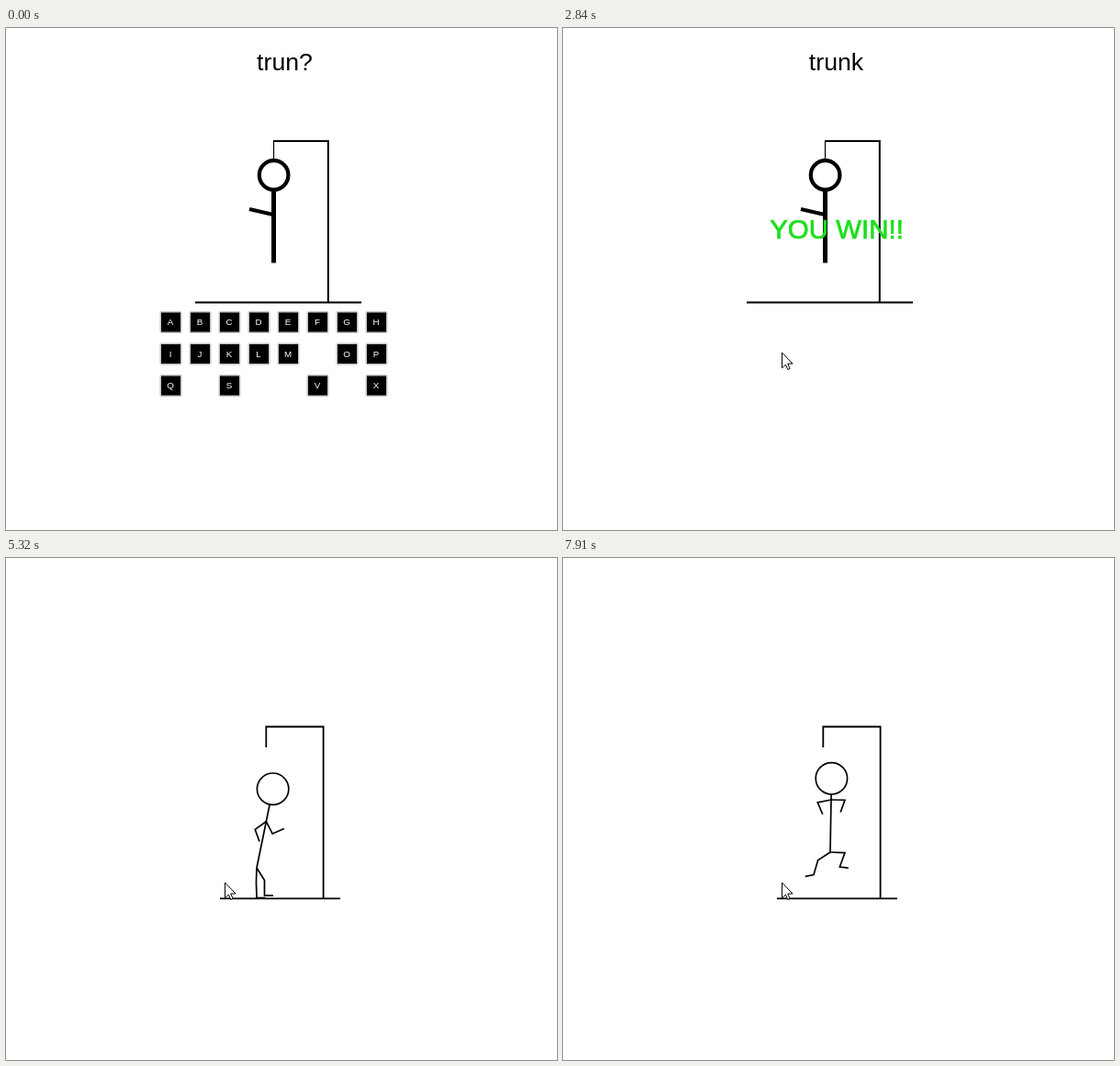
Animation, 600 px wide and 546 px high, one loop 8 s. Source, as an HTML page with a canvas:

```html
<!DOCTYPE html>
<html lang="en">
<head>
<meta charset="utf-8">
<title>Hangman</title>
<style>
  html, body { margin: 0; width: 100%; height: 100%; overflow: hidden; background: #fff; }
  canvas { display: block; }
</style>
</head>
<body>
<canvas id="stage" width="600" height="546"></canvas>
<script>
const ctx = document.getElementById('stage').getContext('2d');
const LOOP = 8000, SCROLL = 500, SOLVED = 1720, CHEER = 1870, DANCE = 3900;
const HOP = 630, SWAY = 2 * HOP, LEAP_AT = 7910, LEFT_AT = 7100;
const FONT = '"Liberation Sans", Arial, sans-serif';
const HEAD = 17.2, ARM = [15, 14], LEG = [16, 16.5, 9.5];

// torso: length, shoulder height, tilt. Limbs: direction of each bone in degrees, 90 is down.
const STAND = { hip: [283.5, 337], torso: [78, 52, 0],
  armL: [188, -56], armR: [-26, -114], legL: [110, 88, 180], legR: [67, 106, 0] };
const LEAN = { hip: [273, 337], torso: [70.4, 51.5, 11.6],
  armL: [144, 70], armR: [63, -24], legL: [92, 88, 360], legR: [58, 90, 0] };
const CROUCH = { hip: [251.5, 337.5], torso: [61.5, 57, 1.4],
  armL: [130, 24], armR: [-7, 104], legL: [132, 60, 152], legR: [0, 112, 6] };
const LEAP = { hip: [291, 320], torso: [63, 57, 1],
  armL: [169, 67], armR: [1, 110], legL: [147, 106, 169], legR: [2, 110, 6] };

const mix = (a, b, k) => a + (b - a) * k;
const ramp = (t, from, to) => Math.min(1, Math.max(0, (t - from) / (to - from)));
const smooth = k => k * k * (3 - 2 * k);
const wave = (t, peak, period) => Math.cos(2 * Math.PI * (t - peak) / period);

function blend(a, b, k) {
  const pose = {};
  for (const part in a) pose[part] = a[part].map((v, i) => mix(v, b[part][i], k));
  return pose;
}

function move([x, y], length, degrees) {
  const angle = degrees * Math.PI / 180;
  return [x + length * Math.cos(angle), y + length * Math.sin(angle)];
}

function line(points, width) {
  ctx.lineWidth = width;
  ctx.beginPath();
  points.forEach(p => ctx.lineTo(...p));
  ctx.stroke();
}

function ring([x, y], r, width) {
  ctx.lineWidth = width;
  ctx.beginPath();
  ctx.arc(x, y, r, 0, 2 * Math.PI);
  ctx.stroke();
}

function text(str, x, y, size, color) {
  ctx.font = `${size}px ${FONT}`;
  ctx.fillStyle = color;
  ctx.fillText(str, x, y);
}

function keyboard() {
  [...'ABCDEFGHIJKLM.OPQ.S..V.X'].forEach((letter, i) => {
    if (letter === '.') return;
    const x = 173.5 + 32 * (i % 8), y = 320 + 34.5 * Math.floor(i / 8);
    ctx.fillStyle = '#c4c4c4';
    ctx.beginPath();
    ctx.roundRect(x - 12, y - 12, 24, 24, 2);
    ctx.fill();
    ctx.fillStyle = '#000';
    ctx.fillRect(x - 10.5, y - 10.5, 21, 21);
    text(letter, x - 0.5, y + 3.3, 9.8, '#fff');
  });
}

function cheer(t) {
  const size = Math.min(207, 66 + 0.0792 * (t - CHEER)) / 4.85;
  const y = 218.3 + 0.358 * size;
  text('YOU WIN!!', 298, y, size, '#1cdf1c');
  ctx.save();
  ctx.strokeStyle = '#1cdf1c';
  ctx.lineWidth = size * 0.025;
  ctx.strokeText('YOU WIN!!', 298, y);
  ctx.restore();
}

function game(t) {
  ctx.save();
  if (t < SCROLL) ctx.translate(6, 0);
  text(t < SOLVED ? 'trun?' : 'trunk', 297.5, 46.3, 26.67, '#000');
  line([[285.5, 143], [285.5, 122]], 1.2);
  line([[285, 123], [344.8, 123], [344.8, 298]], 2);
  line([[200, 298.4], [381, 298.4]], 2);
  ring([285.6, 160], 15.8, 4.2);
  line([[285.5, 177], [285.5, 255.5]], 5);
  line([[259, 197], [285, 203]], 4);
  if (t < SOLVED) keyboard();
  ctx.restore();
  if (t >= CHEER) cheer(t);
}

function poseAt(t) {
  const intro = blend(STAND, LEAN, smooth(ramp(t, 4200, 4930)));
  const dip = Math.sin(Math.PI * ramp(t, DANCE, 4700));
  intro.torso[0] -= 7 * dip;
  intro.torso[2] -= 6 * dip;

  const run = blend(CROUCH, LEAP, Math.max(0, wave(t, LEAP_AT, HOP)));
  run.hip[0] = 275.5 - 25 * wave(t, LEFT_AT, SWAY);
  return blend(intro, run, smooth(ramp(t, 5320, 5600)));
}

function limb(start, bones, angles) {
  const points = [start];
  angles.forEach((angle, i) => points.push(move(points[i], bones[i], angle)));
  line(points, 1.7);
}

function dancer({ hip, torso: [length, shoulderAt, tilt], armL, armR, legL, legR }) {
  const up = tilt - 90;
  const shoulder = move(hip, shoulderAt, up);
  line([hip, move(hip, length, up)], 1.7);
  ring(move(hip, length + HEAD, up), HEAD, 1.7);
  limb(shoulder, ARM, armL);
  limb(shoulder, ARM, armR);
  limb(hip, LEG, legL);
  limb(hip, LEG, legR);
}

function escape(t) {
  line([[283.3, 206], [283.3, 183.5], [345.6, 183.5], [345.6, 370]], 1.8);
  line([[233, 370.4], [364, 370.4]], 1.8);
  dancer(poseAt(t));
}

function pointer(t) {
  if (t < SCROLL) return;
  // Two strokes of the mouse with a pause between them.
  const path = 0.8 * ramp(t, SCROLL, 1010) + 0.2 * ramp(t, 1290, 1570);
  ctx.save();
  ctx.translate(mix(417, 238.5, path), mix(275, 353, path));
  if (t < SOLVED) ctx.scale(1.2, 1.05);
  ctx.beginPath();
  [[0, 0], [0, 16.8], [3.9, 13.2], [6.3, 18.5], [8.6, 17.5], [6.3, 12.1], [11.5, 12.1]]
    .forEach(p => ctx.lineTo(...p));
  ctx.closePath();
  ctx.fillStyle = '#fff';
  ctx.fill();
  ctx.lineWidth = 1;
  ctx.stroke();
  ctx.restore();
}

function draw(t) {
  ctx.fillStyle = '#fff';
  ctx.fillRect(0, 0, 600, 546);
  ctx.strokeStyle = '#000';
  ctx.textAlign = 'center';
  if (t < DANCE) game(t); else escape(t);
  pointer(t);
}

const start = performance.now();
function loop() {
  draw((performance.now() - start) % LOOP);
  requestAnimationFrame(loop);
}
loop();
</script>
</body>
</html>
```
